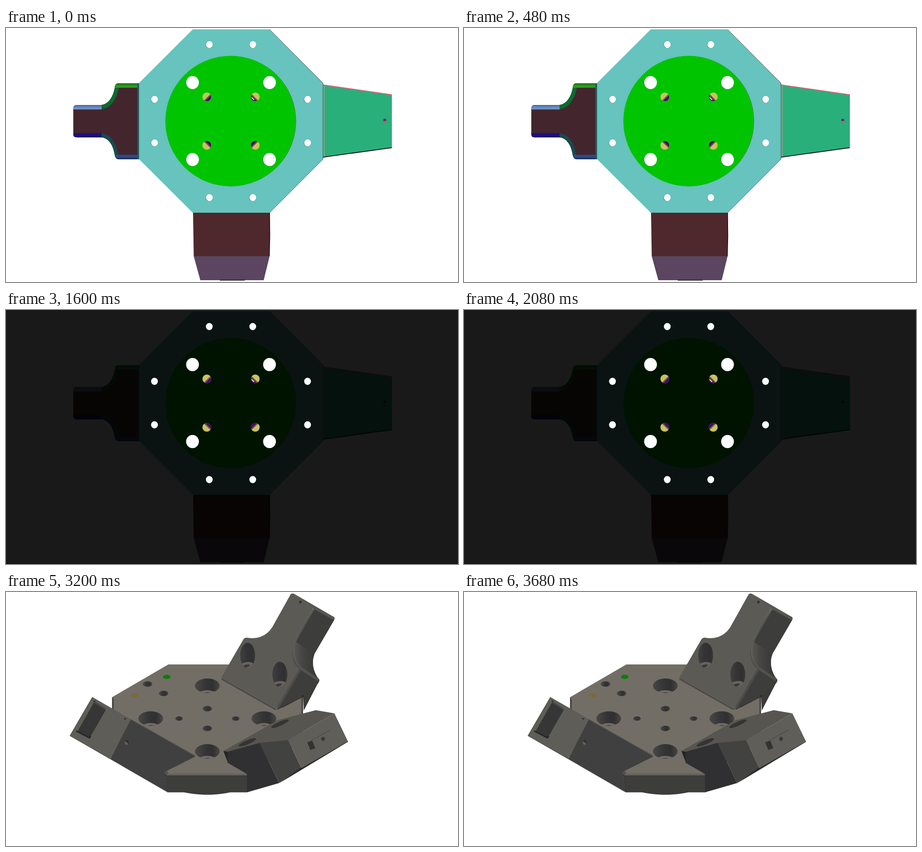
These frames come from a looping animation (998 px wide and 561 px high, 4000 ms). An HTML page:

```html
<!DOCTYPE html>
<html lang="en">
<head>
<meta charset="utf-8">
<title>Hole detection on a machined part</title>
<style>
html, body { margin: 0; width: 100%; height: 100%; overflow: hidden; background: #fff; }
svg { display: block; width: 100vw; height: 100vh; }
text { font: bold 5.2px "Liberation Mono", monospace; fill: #f00; }
</style>
</head>
<body>
<svg id="stage" viewBox="0 0 998 561"></svg>
<script>
const STEP = 800, CX = 496.9, CY = 205.6, TX = 444.5, TY = 279.5;
const ARM = "M294 122H248Q241 122 240 131C236 155 224 170 207 170H156Q148.5 170 148.5 177V234.5Q148.5 241.5 156 241.5H208C224 242 236 255 240 281Q242 290 249 290H294Z";

const poly = (pts, fill) => `<polygon points="${pts}" fill="${fill}"/>`;
const oval = (x, y, rx, ry, fill, turn = 0) =>
  `<ellipse cx="${x}" cy="${y}" rx="${rx}" ry="${ry}" fill="${fill}" transform="rotate(${turn} ${x} ${y})"/>`;
const box = (x, y, w, h, fill, more = "") =>
  `<rect x="${x}" y="${y}" width="${w}" height="${h}" fill="${fill}" ${more}/>`;
const path = (d, fill, more = "") => `<path d="${d}" fill="${fill}" ${more}/>`;
const line = (d, color, w = 1, more = "") => path(d, "none", `stroke="${color}" stroke-width="${w}" ${more}`);
const clip = (id, shape, inside) => `<clipPath id="${id}">${shape}</clipPath><g clip-path="url(#${id})">${inside}</g>`;
const grad = (id, dir, ...stops) => `<linearGradient id="${id}" ${dir}>` +
  stops.map(([o, c, a = 1]) => `<stop offset="${o}" stop-color="${c}" stop-opacity="${a}"/>`).join("") +
  `</linearGradient>`;

// Octagon with mirrored corners (±ax, ±ay) and (±bx, ±by)
const octagon = (x, y, ax, ay, bx, by, fill) =>
  poly([[-ax, -ay], [ax, -ay], [bx, -by], [bx, by], [ax, ay], [-ax, ay], [-bx, by], [-bx, -by]]
    .map(([u, v]) => [x + u, y + v]).join(" "), fill);

// Four holes mirrored about the centre, row by row
const mirror = (dx, dy) => [-1, 1].flatMap(sy => [-1, 1].map(sx => ({ x: CX + sx * dx, y: CY + sy * dy, sx, sy })));
const sides = mirror(169, 48), ends = mirror(48, 169);
const small = [...ends.slice(0, 2), ...sides, ...ends.slice(2)];
const large = mirror(85, 85), inner = mirror(53.5, 53.5);
const scores = "38 36 37 38 35 37 37 37 4 4 39 38 39 39 38 39".split(" ");

const vivid = {
  plate: "#66c3bd", edge: "#23302f", disc: "#00c400", rim: "#7b5a3c", hole: "#2c6a62",
  arm: "#43262d", armTop: "#2a9a22", armLow: "#2c4a86", stubTop: "#6a8fc6", stubLow: "#1e0f86",
  bendTop: "#0b6b30", bendLow: "#174a50", seam: "#22565a",
  wedge: "#29af7a", wedgeTop: "#d95f78", wedgeLow: "#10100f", wedgeSeam: "#8f9f85", pin: "#c0509f", pinTop: "#5c2a50",
  block: "#4e282c", foot: "#5b4560", blockEdge: "#15101a",
  floor: "#c8c35f", band: "#76593f", deep: "#3f0a6c", bandWidth: 2.6
};
const gray = {
  plate: "#63625d", edge: "#53524e", disc: "#63625d", rim: "#2d2d2b", hole: "#333331",
  arm: "#4b4947", armTop: "#575651", armLow: "#403e42", stubTop: "#575651", stubLow: "#403e42",
  bendTop: "#504f4b", bendLow: "#3c3b3c", seam: "#504f4c",
  wedge: "#5b5a54", wedgeTop: "#54534f", wedgeLow: "#252525", wedgeSeam: "#4a4945", pin: "#444340", pinTop: "#2c2c2b",
  block: "#343436", foot: "#2d2f30", blockEdge: "#1c1c1e",
  floor: "#63625d", band: "#454440", deep: "#605f5a", bandWidth: 1.6
};

function holes(c) {
  const open = (rx, ry) => ({ x, y }) => oval(x - .4, y, rx, ry, c.hole) + oval(x, y, rx - .2, ry - .2, "#fff");
  // A step below shows on the side facing the centre
  const step = ({ x, y, sx, sy }) => {
    const turn = Math.atan2(-sy, -sx) * 180 / Math.PI;
    return `<g transform="translate(${x} ${y}) rotate(${turn})" clip-path="url(#round)">` +
      box(-10, -10, 20, 20, c.floor) + box(1.5, -10, 20, 20, c.deep) + box(1.5, -10, c.bandWidth, 20, c.band) +
      (sx > sy ? box(5.6, -3, 1.9, 8, "#fff") : "") + `</g>`;
  };
  return small.map(open(7.6, 8)).join("") + large.map(open(14.2, 14.7)).join("") + inner.map(step).join("");
}

function plan(c) {
  const strips = [["stubTop", 149, 170, 62], ["armTop", 240, 122, 54], ["stubLow", 149, 232, 62], ["armLow", 240, 280, 54]];
  const arm = `<g clip-path="url(#arm)">` + path(ARM, c.arm) +
    line("M204 175H207C230 175 243 150 245 126", c.bendTop, 9) +
    line("M204 236.5H208C229 237 241 257 244 285", c.bendLow, 8) +
    strips.map(([name, x, y, w], i) => box(x - 1, y, w + 1, 10, c[name]) +
      box(x - 1, y, w + 1, 10, i < 2 ? "url(#down)" : "url(#up)")).join("") +
    box(148, 180, 2, 52, "#000", 'opacity=".3"') + box(290, 122, 4, 168, c.seam) + `</g>`;
  const wedge = poly("700,125 852,147 852,264.5 700,285.5", c.wedge) +
    box(700, 126, 3.5, 159, c.wedgeSeam) +
    line("M700 125.7L852 147.5", c.wedgeTop, 2) + line("M700 285.3L852 264.3", c.wedgeLow, 1.8) +
    oval(836.3, 205, 3.5, 4.4, c.pin) + path("M832.8 205A3.5 4.4 0 0 1 839.8 205Z", c.pinTop);
  const block = poly("413,408 582,408 582,504 414.5,504", c.block) +
    poly("414.5,504 582,504 569,557 429,557", c.foot) +
    line("M582 408L582.5 460L581.5 504", c.blockEdge, 1.5) + box(472, 556.3, 55, 1.5, c.blockEdge);
  return arm + wedge + block + octagon(CX, CY, 84.5, 202.5, 203.2, 84, c.plate) +
    line("M582 3L700 122V289.5L582 408", c.edge, .8) +
    oval(496.7, CY, 143.8, 143.8, c.rim) + oval(495.8, CY, 144, 144, c.disc) + holes(c);
}

function tags() {
  const size = i => i < 8 ? 17.3 : i < 12 ? 31 : 20.5;
  return [...small, ...large, ...inner].map(({ x, y }, i) => {
    const s = size(i), left = x - s / 2 - .4, top = y - s / 2, bar = 4.6;
    return `<text x="${left}" y="${top + 4.4}">confidence: 0.${scores[i]}</text>` +
      box(left + bar / 2, top + bar / 2, s - bar, s - bar, "none", `stroke="#f00" stroke-width="${bar}"`);
  }).join("");
}

function tilted() {
  const ring = (dx, dy) => [[0, -dy], [-dx, 0], [dx, 0], [0, dy]].map(([u, v]) => [TX + u, TY + v]);
  const bore = ([x, y], i) => clip("bore" + i, oval(x, y, 27.3, 16),
    box(x - 28, y - 17, 56, 34, "url(#wall)") + oval(x, y + 26, 26, 16, "#716d65") + oval(x, y + 15.4, 5, 1, "#3a3938"));
  const pit = (x, y, r, fill = "url(#wall)") => oval(x, y, r, r * .57, fill);
  const pits = ring(62.5, 21.7).map(([x, y]) => pit(x, y, x === TX ? 10.5 : 8.5)).join("") +
    pit(312.5, 203.3, 10.5) + pit(348, 224, 10.5) + pit(355, 187.3, 8.4, "#0d7d0b") + pit(284.5, 228.2, 8.4, "#796b3c");

  const plate = path("M388 441C420 450 470 450 500 441Z", "#3c3c3b") +
    octagon(445, 281, 86.5, 121, 211, 48.5, "#726e66") +
    poly("234,233 238,236 238,262 234,260", "#4b4a47") + poly("652,234 656,231 656,270 652,270", "#4c4b48") +
    ring(125, 72.5).map(bore).join("") + pits +
    poly("351,398 357,402 532,402 532,442.5 357,442.5", "#3d3d3c") +
    poly("351,398 357,401 532,401 532,405 355,405", "#64615a") + line("M352 397L357 442", "#2d2d2d");

  const left = poly("275,281 417,361 417,364 351,397 357,442.5 230,369", "#404040") +
    line("M275 281L417 361.5", "#565550", 2) +
    poly("190.5,232 276,281 230,369 141,317.5", "#5e5d57") +
    poly("194,240 221,257 219,263 194,248", "#4c4b48") + poly("194,244 220,261 185,322 158,308", "#363636") +
    line("M155 307L184 322L187 318", "#252525", 3) + line("M191 232L141 317.5L230 368.5", "#3c3b39", .8) +
    oval(266, 333, 4, 4.7, "#5f5e5b") + path("M263 330A4 4.7 0 0 1 270 335Q267 330 263 330Z", "#242424") +
    oval(195.5, 241, 2, 1.5, "#2b2b2a") + oval(263, 280, 2.5, 1.5, "#2b2b2a") + oval(354, 399, 4, 3.5, "#54524d");

  const right = poly("480,351 600,283 684,261 725,268 623,327 560,333 490,354", "#56554f") +
    poly("480,351 490,353 490,377", "#242426") +
    poly("489,353 560,333 603,422 532,442.5 532,402 489,377", "#303032") +
    poly("560,333 623,327 652,389 603,422", "#424241") +
    poly("603,422.5 652,387 755,329 755,331", "#2b2b2c") +
    poly("623,327 725,268 755,330 652,389", "#5f5e58") +
    oval(605, 291, 21, 4.5, "#343433", -24) + oval(533, 332, 21, 4.5, "#343433", -23) +
    poly("665,332 676,328 683,345 672,349", "#333332") + line("M675 327L716 305", "#484742", 1.2) +
    oval(700, 324.3, 4.3, 4.6, "#3b3a38");

  const socket = (x, y) => clip("socket" + x, oval(x, y, 16.5, 28, 28),
    box(x - 26, y - 30, 52, 60, "url(#wall)") + oval(x - 3, y + 24, 17, 9, "#66645e", -12) +
    oval(x - 3, y + 23.5, 8, 3, "#393837", -15));
  const upper = poly("640,205 692,195 657.5,262 656,231 610,256", "#3b3b3a") +
    path("M680 36L724 55Q727 58 724 63L681 137C673 158 680 180 692 194Q692 198 689 202L656 231L610 254L596 260L620 130Z", "#3d3d3c") +
    path("M676 38L640 102C627 128 633 157 658 173L692 194C680 180 673 158 681 137L640 110Z", "url(#bend)") +
    path("M636 4L722 54Q726 57 724 62L680 38Z", "#575650") +
    path("M628.5 5Q631 2 636 4L680 35L640 102C626 127 630 158 648 170L646 175L600 258Q596 262 591 259L477 195Q474 193 476 188L524.5 104Q528 100 533 101C557 105 578 96 590 74Z", "#5b5a54") +
    line("M679 37L641 102C628 127 633 157 654 171L690 194", "#65645e", 6, 'opacity=".5"') +
    line("M649 172L601 255", "#4d4c48", 5) + line("M600 259L656 231", "#343433", 1.5) +
    line("M477 192.5L595 260", "#3a3937", 1.2) +
    socket(533.5, 140) + socket(604.5, 182) +
    oval(650, 22.3, 3, 3, "#333332") + oval(655.5, 230, 1.5, 2, "#222");
  return plate + left + right + upper;
}

const vert = 'x1="0" y1="0" x2="0" y2="1"';
document.getElementById("stage").innerHTML = "<defs>" +
  `<clipPath id="arm"><path d="${ARM}"/></clipPath><clipPath id="round"><circle r="9.7"/></clipPath>` +
  grad("down", vert, [0, "#000", .32], [.55, "#000", 0]) +
  grad("up", vert, [.45, "#000", 0], [1, "#000", .4]) +
  grad("wall", "", [0, "#484846"], [.45, "#343436"], [.7, "#303032"], [1, "#474745"]) +
  grad("bend", "", [0, "#5a5953"], [.35, "#464543"], [1, "#333334"]) + "</defs>" +
  box(0, 0, 998, 561, "#fff") +
  `<g id="color">${plan(vivid)}</g><g id="tags">${tags()}</g>` +
  `<g id="dim">${box(0, 0, 998, 561, "#000", 'opacity=".9"')}${holes(vivid)}${box(0, 560, 998, 1, "#0a0a0a")}</g>` +
  `<g id="gray">${plan(gray)}</g><g id="tilt">${tilted()}</g>`;

const views = [["color"], ["color", "tags"], ["color", "dim"], ["gray"], ["tilt"]];
const layers = ["color", "tags", "dim", "gray", "tilt"].map(id => document.getElementById(id));

function show(ms) {
  const view = views[Math.floor(ms / STEP) % views.length];
  for (const g of layers) g.style.display = view.includes(g.id) ? "" : "none";
}

const start = performance.now();
function tick() {
  show(performance.now() - start);
  requestAnimationFrame(tick);
}
tick();
</script>
</body>
</html>
```
